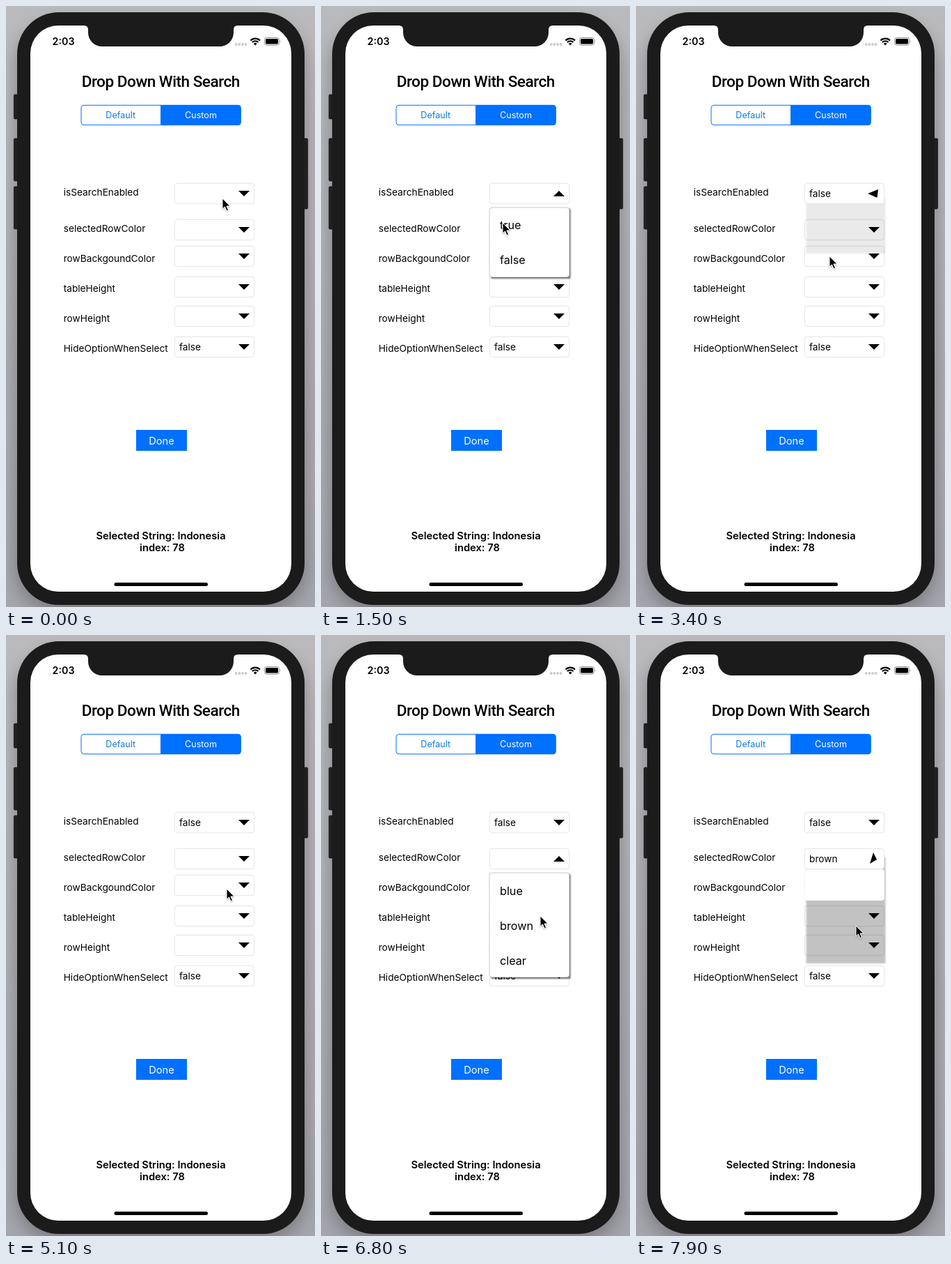
An HTML page that plays this animation: 444x862 px, repeating every 8000 ms.

```html
<!DOCTYPE html>
<html lang="en">
<head>
<meta charset="utf-8">
<title>Drop Down With Search</title>
<style>
  html, body { margin: 0; width: 100%; height: 100%; overflow: hidden; background: #b0b0b5; }
  svg { display: block; }
  text { font: 13.7px Inter, "Liberation Sans", sans-serif; fill: #000; }
  .mid { text-anchor: middle; }
  .title { font: 500 22.6px Roboto, sans-serif; letter-spacing: -.5px; }
  .seg { font-size: 12.6px; }
  .done { font-size: 14.6px; fill: #fff; }
  .bold { font-size: 14.7px; font-weight: 600; }
  .row { font-size: 16.2px; }
  .field { fill: #fff; stroke: #dedede; stroke-width: .8; }
</style>
</head>
<body>
<svg id="stage" width="444" height="862" viewBox="0 0 444 862">
  <defs>
    <linearGradient id="wall" x2="0" y2="1">
      <stop stop-color="#bababd"/><stop offset="1" stop-color="#a5a5ad"/>
    </linearGradient>
    <filter id="far" x="-20%" y="-20%" width="140%" height="140%"><feGaussianBlur stdDeviation="12"/></filter>
    <filter id="soft" filterUnits="userSpaceOnUse" x="230" y="240" width="150" height="320"><feGaussianBlur stdDeviation="1.3"/></filter>
    <filter id="tip" x="-50%" y="-50%" width="200%" height="200%"><feDropShadow dx="0" dy="1" stdDeviation="1" flood-opacity=".35"/></filter>
  </defs>
  <rect width="444" height="862" fill="url(#wall)"/>
  <rect x="14" y="24" width="417" height="846" rx="62" opacity=".25" filter="url(#far)"/>
  <g fill="#202020" stroke="#0c0c0c" stroke-width=".7">
    <rect x="11.4" y="127" width="8" height="35" rx="1.5"/>
    <rect x="11.4" y="190" width="8" height="61" rx="1.5"/>
    <rect x="11.4" y="259" width="8" height="61" rx="1.5"/>
    <rect x="425.6" y="190" width="8" height="101" rx="1.5"/>
  </g>
  <rect x="16" y="9" width="413" height="850" rx="60" fill="#1b1b1b"/>
  <rect x="35" y="28" width="375" height="812" rx="40" fill="#fff"/>
  <path d="M112 27v1q6 0 6 6v4a20 20 0 0 0 20 20h169a20 20 0 0 0 20-20v-4q0-6 6-6v-1z" fill="#1b1b1b"/>

  <text class="bold" x="66.5" y="56.3" style="font-size:14.3px">2:03</text>
  <g fill="#cbcbcb">
    <circle cx="330.7" cy="55" r="1.9"/><circle cx="335.3" cy="55" r="1.9"/>
    <circle cx="339.9" cy="55" r="1.9"/><circle cx="344.5" cy="55" r="1.9"/>
  </g>
  <g fill="none" stroke="#000" stroke-width="2.1">
    <path d="M351.4 49.4a9.6 9.6 0 0 1 13.6 0M353.8 52.1a6.2 6.2 0 0 1 8.8 0"/>
    <path d="M358.2 56.4l-2.4-2.5a3.4 3.4 0 0 1 4.8 0z" fill="#000" stroke="none"/>
  </g>
  <rect x="371.5" y="45.5" width="21" height="10.6" rx="2.8" fill="none" stroke="#8c8c8c"/>
  <rect x="373" y="47" width="18" height="7.6" rx="1.5"/>
  <path d="M394 49q1.6 1.8 0 3.6z" fill="#888"/>

  <text class="title mid" x="222.3" y="115.6">Drop Down With Search</text>
  <rect x="108" y="142.3" width="229.3" height="28.4" rx="4" fill="#fff" stroke="#0070ff"/>
  <path d="M222 142h111.500a4 4 0 0 1 4 4v21a4 4 0 0 1-4 4H222z" fill="#0070ff"/>
  <text class="seg mid" x="164.700" y="161" style="fill:#0a78e6">Default</text>
  <text class="seg mid" x="280" y="161" style="fill:#fff">Custom</text>

  <g id="form"></g>

  <rect x="187" y="608" width="73" height="30" fill="#0070ff"/>
  <text class="done mid" x="223.500" y="628.5">Done</text>
  <text class="bold mid" x="222.500" y="764.8">Selected String: Indonesia</text>
  <text class="bold mid" x="224.500" y="782.300">index: 78</text>
  <rect x="155.500" y="827" width="134.500" height="5" rx="2.500"/>
  <path id="cursor" d="M0 0v15.200l3.500-3.300 2.500 5.900 2.500-1.100-2.500-5.700h4.900z" stroke="#fff" stroke-width="1" filter="url(#tip)"/>
</svg>
<script>
const NS = 'http://www.w3.org/2000/svg';
const LOOP = 8000, STEP = 100, LEFT = 242, WIDTH = 115, ROW = 50;
const form = document.getElementById('form');
const cursor = document.getElementById('cursor');

function add(parent, tag, attrs, text) {
  const el = document.createElementNS(NS, tag);
  set(el, attrs);
  if (text) el.textContent = text;
  parent.append(el);
  return el;
}
function set(el, attrs) {
  for (const k in attrs) el.setAttribute(k, attrs[k]);
}

// Each key is [time, ...values]; values are blended between keys.
function track(keys, t, ease = u => u) {
  if (t <= keys[0][0]) return keys[0].slice(1);
  const i = keys.findIndex(k => k[0] > t);
  if (i < 0) return keys[keys.length - 1].slice(1);
  const a = keys[i - 1], b = keys[i];
  const u = ease((t - a[0]) / (b[0] - a[0]));
  return a.slice(1).map((v, n) => v + (b[n + 1] - v) * u);
}
const smooth = u => u * u * (3 - 2 * u);
const mix = (a, b, u) => a + (b - a) * u;
const clamp = u => Math.min(1, Math.max(0, u));

function spring(ms) {
  const s = ms / 1000, decay = 7.7, w = 17.6;
  return 1 - Math.exp(-decay * s) * (Math.cos(w * s) + decay / w * Math.sin(w * s));
}

const DOWN = [0, 4, 8, -4, -8, -4];
// Times count from the start of hiding.
const ARROW = [
  [0, 0, -4, -8, 4, 8, 4],
  [200, -1, -9, -6, 7, 4, 1],
  [300, -9, 0, 4.5, 6, 6, -6],
  [420, -5, 4, 8, 1, 0, -6],
  [700, ...DOWN]
];
const TABLE = [[0, 1], [100, .75], [200, .3], [290, 0]];
// bottom share, opacity, top shift
const SHADE = [
  [0, 1, .55, 0], [100, .97, .4, -10], [200, .9, .235, -19],
  [300, .71, .078, -10], [400, .45, .03, -5], [520, .2, 0, -5]
];
const PATH = [
  [0, 311, 276], [900, 311, 276], [1500, 261, 311], [1900, 261, 311],
  [2600, 278, 359], [4500, 278, 359], [5000, 317, 364], [5200, 317, 364],
  [5500, 318, 321], [6300, 318, 321], [6800, 315, 403], [7200, 316, 417]
];

const fields = [
  { name: 'isSearchEnabled', y: 254, base: 272.3, rows: ['true', 'false'], pick: 1, open: 100, click: 2800, hide: 3100 },
  { name: 'selectedRowColor', y: 306, base: 323.5, rows: ['blue', 'brown', 'clear'], pick: 1, open: 5600, click: 7400, hide: 7700 },
  { name: 'rowBackgoundColor', y: 344, base: 366.5 },
  { name: 'tableHeight', y: 388, base: 409.500 },
  { name: 'rowHeight', y: 430, base: 452.500 },
  { name: 'HideOptionWhenSelect', y: 474, base: 495.500, value: 'false' }
];

function buildMenu(f) {
  f.menu = add(form, 'g', {});
  f.shade = add(f.menu, 'rect', { x: 244.5, width: 114, filter: 'url(#soft)' });
  f.back = add(f.menu, 'rect', { x: LEFT, width: WIDTH, rx: 4, fill: '#fff' });
  f.clip = add(f.menu, 'svg', { x: LEFT, width: WIDTH });
  f.mark = add(f.clip, 'g', {});
  add(f.mark, 'rect', { y: f.pick * ROW, width: WIDTH, height: ROW, fill: '#aaffff' });
  add(f.mark, 'rect', { x: 15, y: f.pick * ROW + 1, width: 85, height: ROW - 1.5, fill: '#74dcf0' });
  f.labels = f.rows.map((r, i) => add(f.clip, 'text', { class: 'row', x: 15, y: i * ROW + 31.5 }, r));
  f.edge = add(f.menu, 'rect', { x: LEFT, width: WIDTH, rx: 4, fill: 'none', stroke: '#000', 'stroke-opacity': .3, 'stroke-width': .7 });
}

// Lower fields first, so that each menu covers the ones below it.
for (const f of [...fields].reverse()) {
  add(form, 'text', { x: 82.7, y: f.base }, f.name);
  if (f.rows) buildMenu(f);
  add(form, 'rect', { class: 'field', x: 242.3, y: f.y + .3, width: 114.400, height: 29.400, rx: 4 });
  f.text = add(form, 'text', { x: 249, y: f.y + 19.5 }, f.value);
  f.arrow = add(form, 'polygon', { points: DOWN, transform: `translate(342 ${f.y + 15})` });
}

function drawMenu(f, t) {
  const full = f.rows.length * ROW;
  const chosen = t >= f.click + 450;
  const closing = t >= f.hide;
  const u = t - f.hide;
  const p = t < f.open ? 0 : spring(t - f.open);
  const seen = clamp(p);

  let top = f.y + mix(30, 35, p), height = mix(30, full, p);
  let [share, dark, shift] = track(SHADE, u);
  if (closing) {
    const [part] = track(TABLE, u);
    top = f.y + 30 + 5 * clamp(1 - u / 150);
    height = full * part;
  }
  const shadeTop = top + 2 + shift;
  const shadeEnd = closing ? top + full * share : top + height + 2;

  f.menu.style.display = t > f.open && u < 520 ? '' : 'none';
  set(f.shade, { y: shadeTop, height: Math.max(0, shadeEnd - shadeTop), opacity: closing ? dark : dark * seen });
  const box = { y: top, height, opacity: closing ? 1 : seen };
  set(f.back, box);
  set(f.clip, box);
  set(f.edge, { ...box, opacity: closing ? (height > 0 ? clamp(1 - u / 250) : 0) : seen });
  f.back.style.display = f.clip.style.display = height > 0 ? '' : 'none';

  f.mark.style.display = t >= f.click && !chosen ? '' : 'none';
  f.labels.forEach((label, i) => {
    const picked = i === f.pick && t >= f.click;
    label.style.opacity = chosen ? 0 : picked ? clamp(.35 + (t - f.click) / 900) : 1;
  });
  f.text.textContent = chosen ? f.rows[f.pick] : '';
  const points = closing ? track(ARROW, u) : track(ARROW, 700 * (1 - seen));
  set(f.arrow, { points: points.map(v => v.toFixed(2)) });
}

function draw(t) {
  fields.filter(f => f.rows).forEach(f => drawMenu(f, t));
  const [x, y] = track(PATH, t, smooth);
  set(cursor, { transform: `translate(${x.toFixed(1)} ${y.toFixed(1)})` });
}

const start = performance.now();
function tick() {
  const t = (performance.now() - start) % LOOP;
  draw(Math.floor(t / STEP) * STEP);
  requestAnimationFrame(tick);
}
tick();
</script>
</body>
</html>
```
